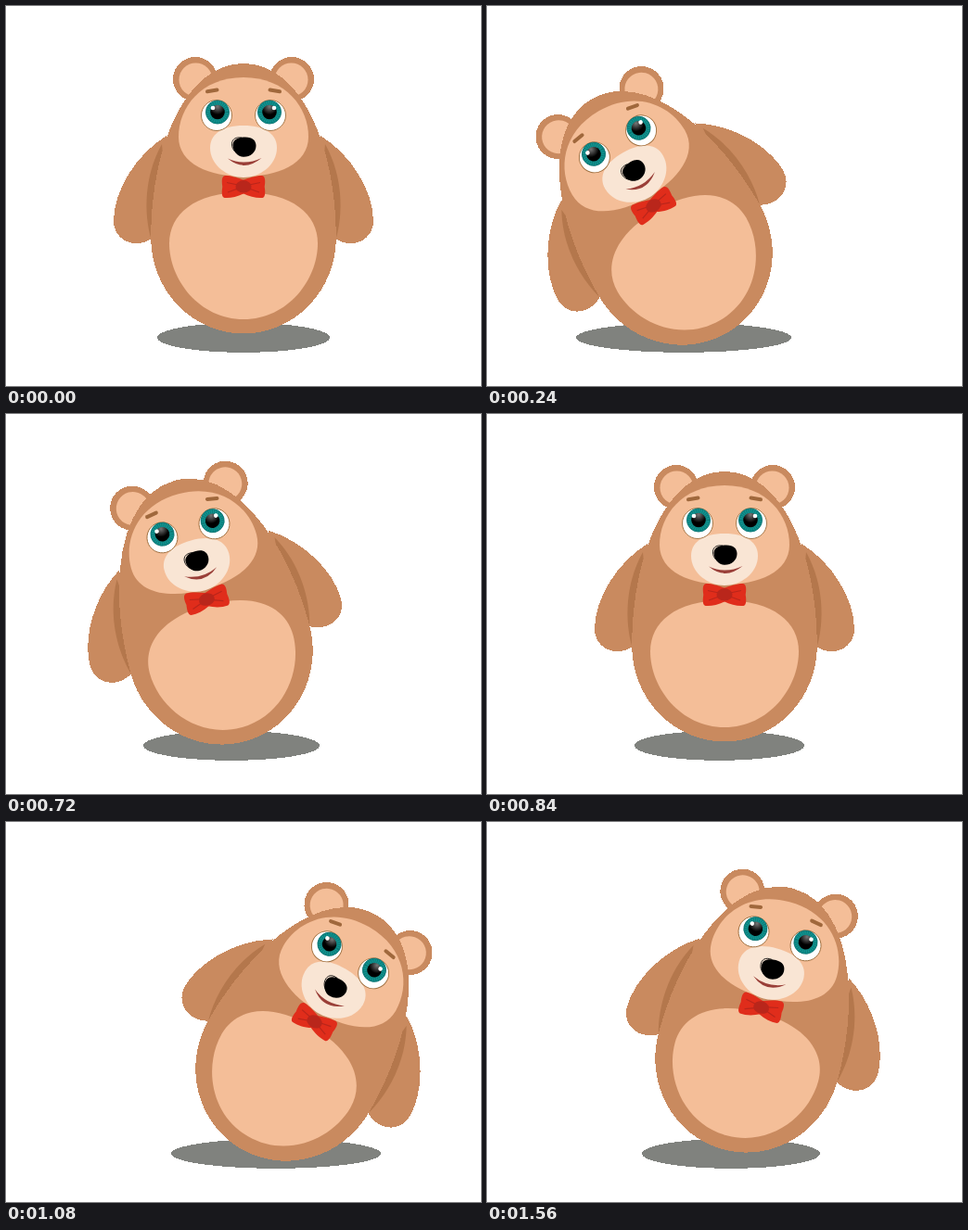
Write an HTML page that moves like this. It is 512 px wide and 410 px high and loops after 1680 ms.

```html
<!DOCTYPE html>
<html lang="en">
<head>
<meta charset="utf-8">
<title>Swaying bear</title>
<style>
html, body { margin: 0; width: 100%; height: 100%; overflow: hidden; background: #fff; }
svg { display: block; width: 100vw; height: 100vh; }
.fur { fill: #c98a5f; }
.fur, #shadow { shape-rendering: crispEdges; }
</style>
</head>
<body>
<svg viewBox="0 0 512 410" xmlns="http://www.w3.org/2000/svg">
  <defs>
    <radialGradient id="sheen" cx=".5" cy=".12" r=".55">
      <stop offset="0" stop-color="#777"/>
      <stop offset="1" stop-color="#000"/>
    </radialGradient>
    <g id="ear">
      <circle class="fur" cx="204" cy="79" r="24"/>
      <circle cx="204.5" cy="79.5" r="18" fill="#f4be98"/>
    </g>
    <g id="arm">
      <path class="fur" d="M173 140C140 160 116 200 116 232C116 246 127 256 140 256C148 256 154 254 165 246Z"/>
      <path fill="#b4774c" d="M168 149C148 185 149 225 156 250L175 230Z"/>
    </g>
    <g id="eye">
      <circle cx="227" cy="118" r="16.5" fill="#fff" stroke="#a0703f" stroke-width=".9"/>
      <circle cx="228" cy="114.5" r="12.6" fill="#119490" stroke="#0b6f6e" stroke-width=".8"/>
      <circle cx="228" cy="114.5" r="10" fill="none" stroke="#0c7674" stroke-width="4.5" stroke-dasharray=".8 1.4"/>
      <circle cx="228" cy="114.5" r="7.8" fill="url(#sheen)"/>
      <circle cx="223" cy="110" r="2.3" fill="#fff"/>
    </g>
    <path id="brow" d="M217 92.3L227.5 90.5" stroke="#a0683c" stroke-width="4" stroke-linecap="round"/>
    <g id="lobe">
      <path fill="#e02d1b" d="M257 188C249 185 240 182.5 236 183C232 184 232.5 190 233.3 195C232.5 200 232 206 235.5 207C242 207.5 249 206 257 202Z"/>
      <path fill="none" stroke="#b9261b" stroke-width="1.2" d="M250 193L238 190.5M250 197L239 201"/>
    </g>
  </defs>
  <ellipse id="shadow" cy="357.8" ry="16" fill="#80827e"/>
  <g id="bear">
    <g class="pair" data-part="ear"></g>
    <g class="pair" data-part="arm"></g>
    <path class="fur" d="M156.2 250C156.2 150 194.5 62 256 62C317.5 62 355.8 150 355.8 250A99.8 103.5 0 0 1 156.2 250Z"/>
    <path fill="#f4be98" d="M256 77C302 77 326 110 326 141C326 171 292 184 256 184C220 184 186 171 186 141C186 110 210 77 256 77Z"/>
    <path fill="#f4be98" d="M256 201C309 201 336 225 336 256C336 295 304 338 256 338C208 338 176 295 176 256C176 225 203 201 256 201Z"/>
    <path fill="#f9e5d4" d="M256 129C280 129 292 139 292 153C292 172 273 185 256 185C239 185 220 172 220 153C220 139 232 129 256 129Z"/>
    <g class="pair" data-part="brow"></g>
    <g class="pair" data-part="eye"></g>
    <path d="M244.5 150C244.5 144 251 141.5 258 141.5C266 141.5 269.5 145.5 269.5 151C269.5 158 263 162.8 256.5 162.8C250 162.8 244.5 157 244.5 150Z"/>
    <path fill="none" stroke="#000" stroke-width=".8" d="M254 142C246 141 243 145 243.5 150C244 155 247 158 251 160"/>
    <path fill="#9a3f38" d="M239 164.5Q257 172.8 275.5 164Q257 179.5 239 164.5Z"/>
    <g class="pair" data-part="lobe"></g>
    <path fill="#b9261b" d="M249 191Q256 185 263 191Q266 195 263 199Q256 204 249 199Q246 195 249 191Z"/>
  </g>
</svg>
<script>
const STEP = 120, COUNT = 14, HALF = 7;
const bear = document.getElementById('bear');
const shadow = document.getElementById('shadow');

// left and right end of the shadow for each step
const spans = [
  [163, 349], [150, 344], [96, 328], [100, 328], [105, 328], [110, 329], [148, 338],
  [159, 342], [167, 359], [178, 404], [178, 404], [178, 404], [178, 404], [167, 359]
];

// each paired part appears once as drawn and once mirrored
for (const g of document.querySelectorAll('.pair')) {
  const use = `<use href="#${g.dataset.part}"`;
  g.innerHTML = `${use}/>${use} transform="translate(512 0) scale(-1 1)"/>`;
}

function tilt(step) {
  const side = step < HALF ? -1 : 1;
  const p = step % HALF;
  return side * 15 * Math.min(p, HALF - p, 2);
}

function draw(ms) {
  const step = Math.floor(ms / STEP) % COUNT;
  const [left, right] = spans[step];
  bear.setAttribute('transform', `rotate(${tilt(step)} 256 348)`);
  shadow.setAttribute('cx', (left + right) / 2);
  shadow.setAttribute('rx', (right - left) / 2);
}

const start = performance.now();
function tick() {
  draw(performance.now() - start);
  requestAnimationFrame(tick);
}
draw(0);
requestAnimationFrame(tick);
</script>
</body>
</html>
```
